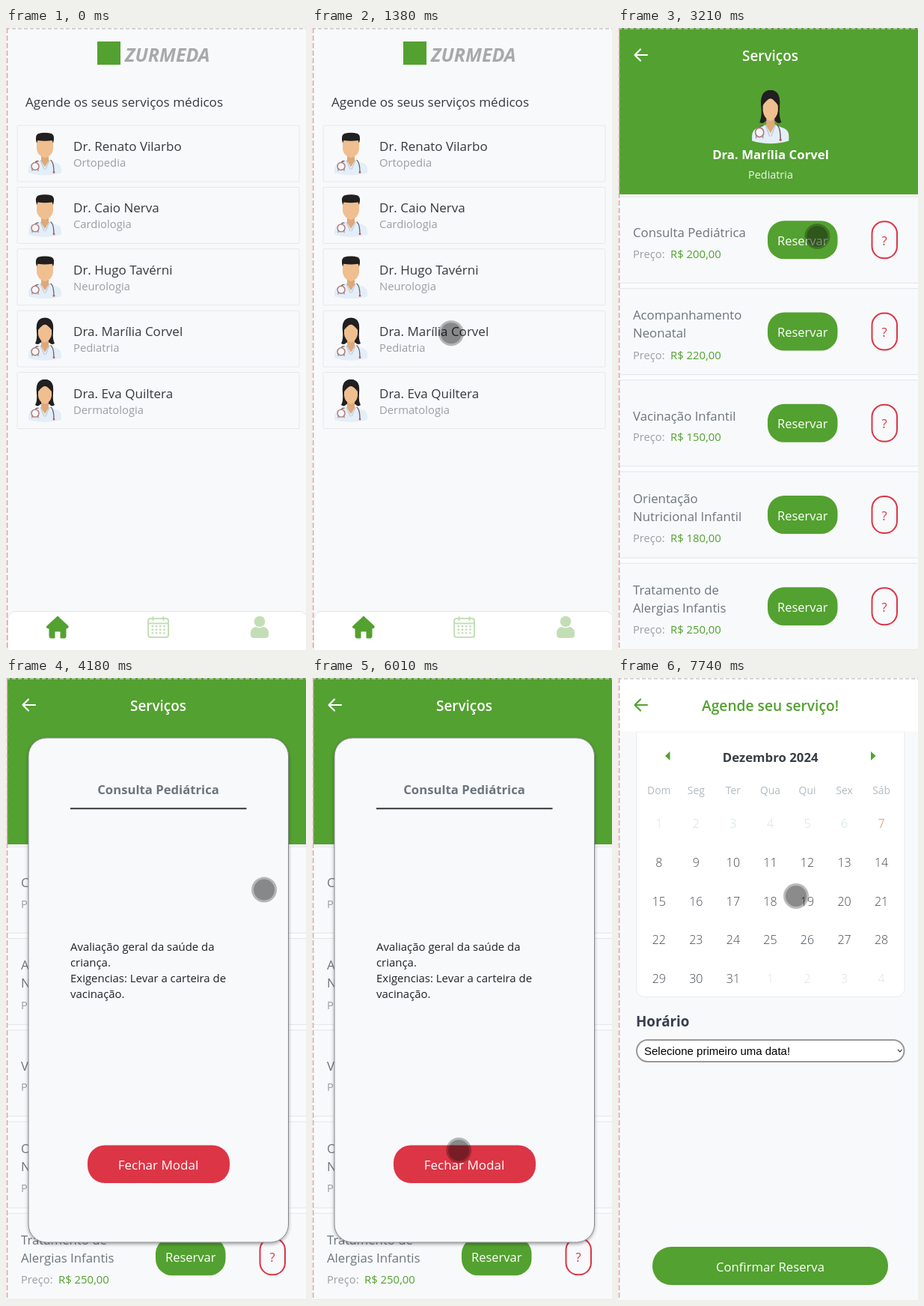
An HTML page that plays this animation: 401 px wide and 830 px high, repeating every 8000 ms.

```html
<!DOCTYPE html>
<html lang="pt-BR">
<head>
<meta charset="utf-8">
<title>Agendamento de consultas</title>
<style>
  html, body { margin: 0; width: 100%; height: 100%; overflow: hidden; background: #fff; }
  svg { display: block; width: 100vw; height: 100vh; }
  text { font-family: "Open Sans", "Noto Sans", sans-serif; }
</style>
</head>
<body>
<svg id="stage" viewBox="0 0 401 830" xmlns="http://www.w3.org/2000/svg"></svg>
<script>
const LOOP = 8000;
const GREEN = '#53a130', RED = '#dc3545', PAGE = '#f8f9fb', GREY = '#6c757d', SOFT = '#9b9fa3';

const text = (x, y, size, fill, str, extra = '') =>
  `<text x="${x}" y="${y}" font-size="${size}" fill="${fill}" ${extra}>${str}</text>`;
const mid = (x, y, size, fill, str, weight = 400) =>
  text(x, y, size, fill, str, `text-anchor="middle" font-weight="${weight}"`);
const rect = (x, y, w, h, r, fill, extra = '') =>
  `<rect x="${x}" y="${y}" width="${w}" height="${h}" rx="${r}" fill="${fill}" ${extra}/>`;
const path = (d, fill, extra = '') => `<path d="${d}" fill="${fill}" ${extra}/>`;
const line = (d, color, width) =>
  path(d, 'none', `stroke="${color}" stroke-width="${width}" stroke-linecap="round" stroke-linejoin="round"`);
const group = (transform, body) => `<g transform="${transform}">${body}</g>`;
const backArrow = color => line('M39 36H23M30 28.5L22.5 36L30 43.5', color, 2.2);

// Portrait in a 46 x 57 box
function doctor(female) {
  const hair = '#211f20', skin = '#efbf8f';
  const back = female ? path('M23 0C13 0 11 8 12 18Q13 29 10 34Q14 37 17 33H29Q32 37 36 34Q33 29 34 18C35 8 33 0 23 0Z', hair) : '';
  const face = female
    ? path('M14 13Q23 5 32 13V22Q31 30 23 33Q15 30 14 22Z', skin)
    : path('M12 10H34V22Q33 31 23 34Q13 31 12 22Z', skin);
  const top = female
    ? path('M12.5 19C10 6 16 0 23 0S36 6 33.5 19Q31 13 23 8Q15 13 12.5 19Z', hair)
    : path('M12 14Q9 4 14 1.5Q23 -1 32 1.5Q37 4 34 14L32.5 10.5Q23 12 13.5 10.5Z', hair);
  return back +
    path('M1 54Q0 43 6 41L17 37H29L40 41Q46 43 45 54Q23 60 1 54Z', '#e4eef8') +
    path('M18 30H28V38L23 46L18 38Z', '#dfa878') + face + top +
    line('M17 37L22 49M29 37L24 49', '#b3c4d4', 1) +
    line('M14 38Q11 38 10 40M31 37Q35 40 35 53', '#66606a', 1.3) +
    `<circle cx="10" cy="45" r="5" fill="#f4f7fa" stroke="#b4766f" stroke-width="1.4"/>` +
    line('M6 48V51M14 48V51', '#8a7a80', 1) +
    `<circle cx="35" cy="53" r="1.4" fill="#c4555a"/>`;
}

function home() {
  const staff = [
    ['Dr. Renato Vilarbo', 'Ortopedia'],
    ['Dr. Caio Nerva', 'Cardiologia'],
    ['Dr. Hugo Tavérni', 'Neurologia'],
    ['Dra. Marília Corvel', 'Pediatria'],
    ['Dra. Eva Quiltera', 'Dermatologia']
  ];
  const cards = staff.map(([name, field], i) => group(`translate(0 ${130 + i * 82.4})`,
    rect(15, 0, 377, 75, 1, PAGE, 'stroke="#e6e8ea"') +
    group('translate(29 9.5)', doctor(name.startsWith('Dra'))) +
    text(90, 34, 17, '#35393d', name) + text(90, 55, 14.8, SOFT, field))).join('');

  const pale = '#c3deb7';
  let dots = '';
  for (let i = 0; i < 12; i++)
    dots += rect(194.5 + (i % 4) * 5.2, 797 + Math.floor(i / 4) * 4.6, 2.6, 2.4, .5, pale);

  return rect(0, 0, 401, 830, 0, PAGE) +
    rect(122, 18, 31, 31, 0, GREEN) +
    text(159, 45, 25, '#a9a9a9', 'ZURMEDA', 'font-weight="700" font-style="italic"') +
    text(26, 105, 17.1, '#35393d', 'Agende os seus serviços médicos') + cards +
    rect(2.5, 778.5, 400, 70, 10, '#fff', 'stroke="#e2e4e6"') +
    path('M69 785L83 798Q84 801 81 801H80V812Q80 814 78 814H73V805H65V814H60Q58 814 58 812V801H56Q53 800 55 798Z', GREEN,
      `stroke="${GREEN}" stroke-linejoin="round"`) +
    rect(190.2, 788, 26.8, 25, 3, 'none', `stroke="${pale}" stroke-width="2"`) +
    line('M190 794.5H217M196.5 786V790M210.5 786V790', pale, 2) + dots +
    `<circle cx="339" cy="792" r="7.3" fill="${pale}"/>` +
    path('M327 811Q326 800 334 799Q339 802 344 799Q352 800 351 811Q350 814 347 814H331Q328 814 327 811Z', pale);
}

function services() {
  const offers = [
    [['Consulta Pediátrica'], 200],
    [['Acompanhamento', 'Neonatal'], 220],
    [['Vacinação Infantil'], 150],
    [['Orientação', 'Nutricional Infantil'], 180],
    [['Tratamento de', 'Alergias Infantis'], 250]
  ];
  const rows = offers.map(([lines, price], i) => {
    const two = lines.length > 1, first = two ? 41.5 : 54, priceY = two ? 94 : 81.5;
    return group(`translate(0 ${225.3 + i * 122.25})`,
      rect(0, 0, 401, 115, 0, PAGE) +
      rect(0, -.5, 401, 1, 0, '#e3e5e7') + rect(0, 114.5, 401, 1, 0, '#e3e5e7') +
      lines.map((s, k) => text(20, first + k * 24, 16.8, GREY, s)).join('') +
      text(20, priceY, 14.7, SOFT, 'Preço:') +
      text(70, priceY, 14.9, GREEN, `R$ ${price},00`) +
      rect(200, 32, 93.5, 51, 22, GREEN) + mid(246.7, 64.5, 16.5, '#fff', 'Reservar') +
      rect(339.5, 33, 33.5, 49, 16, 'none', `stroke="${RED}" stroke-width="2"`) +
      mid(356, 64.5, 16.5, RED, '?'));
  }).join('');
  return rect(0, 0, 401, 830, 0, '#fbfcfd') + rows +
    rect(0, 0, 401, 222, 0, GREEN) + backArrow('#fff') +
    mid(203.5, 43.5, 18.9, '#fff', 'Serviços', 600) +
    group('translate(178 83) scale(1.12 1.25)', doctor(true)) +
    mid(204, 175, 16.8, '#fff', 'Dra. Marília Corvel', 700) +
    mid(204, 201, 14.4, '#eef6ea', 'Pediatria');
}

function modal() {
  const body = ['Avaliação geral da saúde da', 'criança.', 'Exigencias: Levar a carteira de', 'vacinação.'];
  return rect(30, 80, 347.5, 673, 24, PAGE, 'stroke="#85898c" filter="url(#shade)"') +
    mid(203.5, 154.5, 16.7, GREY, 'Consulta Pediátrica', 700) +
    rect(86, 173.2, 235.5, 2, 0, '#343a40') +
    body.map((s, i) => text(86, 364 + i * 21, 14.95, '#1f2326', s)).join('') +
    rect(109, 623.5, 190, 50.5, 23, RED) + mid(203.5, 656, 17, '#fff', 'Fechar Modal');
}

function calendar() {
  const colX = i => 54.8 + i * 49.55;
  const week = ['Dom', 'Seg', 'Ter', 'Qua', 'Qui', 'Sex', 'Sáb']
    .map((d, i) => mid(colX(i), 155, 13.9, '#b2bbc1', d)).join('');
  let days = '';
  for (let i = 0; i < 35; i++) {
    const color = i < 6 ? '#d3e2e3' : i === 6 ? '#d38a55' : i > 30 ? '#dce1e4' : '#434b52';
    days += mid(colX(i % 7), 200 + Math.floor(i / 7) * 51.75, 16, color, i % 31 + 1, 300);
  }
  return rect(0, 0, 401, 830, 0, PAGE) +
    rect(24.5, 50, 358.5, 375.5, 11, '#fff', 'stroke="#e9ebed"') +
    rect(0, 0, 401, 71.5, 0, '#fff') + rect(24, 71.5, 360, 1, 0, '#f0f1f2') +
    backArrow(GREEN) + mid(203.5, 43.5, 19.2, GREEN, 'Agende seu serviço!', 600) +
    path('M69.5 98V110L63 104Z', GREEN) + path('M338 98V110L344.5 104Z', GREEN) +
    mid(203.7, 111.5, 16.8, '#383e45', 'Dezembro 2024', 700) + week + days +
    text(24, 465, 18.8, '#383e50', 'Horário', 'font-weight="700"') +
    rect(25, 483, 357.5, 29, 14.5, '#fff', 'stroke="#999" stroke-width="2"') +
    text(35, 503, 15, '#000', 'Selecione primeiro uma data!',
      'style="font-family:\'Liberation Sans\',Arial,sans-serif"') +
    line('M374.3 496.2L376.8 498.8L379.3 496.2', '#333', 1.2) +
    rect(46, 759, 315, 51, 25, GREEN) + mid(203.5, 791.5, 16.7, '#fff', 'Confirmar Reserva');
}

const stage = document.getElementById('stage');
stage.innerHTML =
  `<defs><filter id="shade" x="-5%" y="-5%" width="110%" height="110%">
    <feDropShadow dx="0" dy="2" stdDeviation="2" flood-color="#000" flood-opacity=".35"/></filter></defs>
  <g id="home">${home()}</g><g id="services">${services()}</g>
  <g id="modal">${modal()}</g><g id="calendar">${calendar()}</g>
  <path d="M0 1H401" stroke="#c9c9c9" stroke-width="1.3" stroke-dasharray="5 3"/>
  <rect width="1.6" height="830" fill="#fbf3f3"/>
  <path d="M1.6 0V830" stroke="#dfa5a5" stroke-width="1.5" stroke-dasharray="7 3"/>
  <g id="pointer"><circle r="17" opacity=".27"/><circle r="14" opacity=".25"/></g>`;
const [servicesEl, modalEl, calendarEl, pointerEl] =
  ['services', 'modal', 'calendar', 'pointer'].map(id => document.getElementById(id));

// Pointer stops: time, x, y
const stops = [
  [110, 322, 850], [400, 285, 590], [650, 205, 240], [800, 183, 150], [930, 187, 206],
  [1380, 186, 407], [1480, 188, 425], [1940, 188, 426], [2090, 211, 361], [2400, 307, 302],
  [2760, 190, 279], [2940, 133, 282], [3210, 266, 278], [3530, 354, 285], [3680, 353, 286],
  [4130, 350, 286], [4450, 255, 236], [4940, 115, 391], [5040, 113, 390], [5390, 309, 380],
  [5810, 112, 424], [6010, 196, 630], [6210, 229, 660], [6570, 230, 660], [6900, 280, 450],
  [7270, 238, 291]
];

// Monotone cubic interpolation, so pauses stay still and turns do not overshoot
function along(t, axis) {
  const last = stops.length - 1;
  if (t <= stops[0][0]) return stops[0][axis];
  if (t >= stops[last][0]) return stops[last][axis];
  const i = stops.findIndex(s => s[0] > t) - 1;
  const slope = k => (stops[k + 1][axis] - stops[k][axis]) / (stops[k + 1][0] - stops[k][0]);
  const tangent = k => {
    if (k === 0 || k === last) return 0;
    const a = slope(k - 1), b = slope(k);
    return a * b <= 0 ? 0 : 2 * a * b / (a + b);
  };
  const [p, q] = [stops[i], stops[i + 1]], h = q[0] - p[0], u = (t - p[0]) / h, v = 1 - u;
  return p[axis] * v * v * (1 + 2 * u) + q[axis] * u * u * (3 - 2 * u) +
    h * u * v * (v * tangent(i) - u * tangent(i + 1));
}

const ramp = (t, from, to) => Math.min(1, Math.max(0, (t - from) / (to - from)));
function show(el, opacity) {
  el.setAttribute('display', opacity > 0 ? 'inline' : 'none');
  el.setAttribute('opacity', opacity);
}

function draw(t) {
  show(servicesEl, ramp(t, 1620, 1720));
  show(modalEl, ramp(t, 3840, 3980) * (1 - ramp(t, 6320, 6410)));
  show(calendarEl, ramp(t, 7550, 7670));
  show(pointerEl, t >= 160 ? 1 : 0);
  pointerEl.setAttribute('transform', `translate(${along(t, 1)} ${along(t, 2)})`);
}

const start = performance.now();
function tick() {
  draw((performance.now() - start) % LOOP);
  requestAnimationFrame(tick);
}
tick();
</script>
</body>
</html>
```
